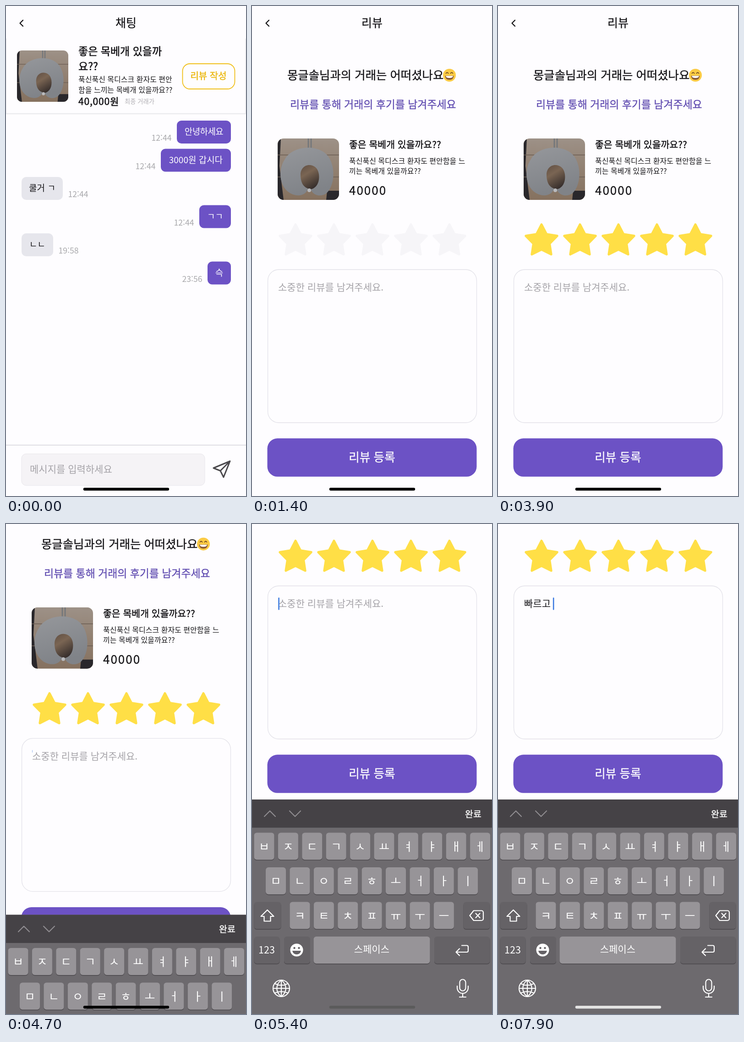
An HTML page for the animation above (8 s loop, 524x1069 px).

```html
<!DOCTYPE html>
<html lang="ko">
<head>
<meta charset="utf-8">
<style>
  html, body { margin: 0; width: 100%; height: 100%; overflow: hidden; background: #fefdff; }
  svg { display: block; width: 100%; height: 100%; }
  text { font-family: "Noto Sans CJK KR", "Noto Sans CJK JP", "Noto Sans CJK", sans-serif; white-space: pre; }
</style>
</head>
<body>
<svg id="stage" viewBox="0 0 524 1069"></svg>
<script>
const LOOP = 8000, W = 524, H = 1069;
const PURPLE = '#6c52c5', PAPER = '#fefdff', INK = '#161518', MUTED = '#a5a3a8';
const KEY = '#979498', DARK_KEY = '#656266';

// ---- SVG helpers ----
const rect = (x, y, w, h, rx, fill, extra = '') =>
  `<rect x="${x}" y="${y}" width="${w}" height="${h}" rx="${rx}" fill="${fill}" ${extra}/>`;
const line = (d, stroke, width, extra = '') =>
  `<path d="${d}" fill="none" stroke="${stroke}" stroke-width="${width}" stroke-linecap="round" stroke-linejoin="round" ${extra}/>`;
const text = (str, x, y, size, { fill = INK, anchor = 'start', bold = 0, weight = 400, ls = 0, id = '' } = {}) =>
  `<text ${id && `id="${id}"`} x="${x}" y="${y}" font-size="${size}" font-weight="${weight}" fill="${fill}" text-anchor="${anchor}"
    letter-spacing="${ls}" ${bold ? `stroke="${fill}" stroke-width="${bold}"` : ''}>${str}</text>`;

const header = title => line('M37 31L30.500 37.500L37 44', INK, 2.3) +
  text(title, 262, 46, 25, { anchor: 'middle', bold: .3 });

const photo = (x, y, size) => `<use href="#photo" transform="translate(${x} ${y}) scale(${size / 134})"/>`;

const defs = `<defs>
  <clipPath id="frame"><rect width="134" height="134" rx="13"/></clipPath>
  <linearGradient id="wood" x2="0" y2="1">
    <stop offset="0" stop-color="#9d9187"/><stop offset=".6" stop-color="#8f7d6d"/><stop offset="1" stop-color="#85715f"/>
  </linearGradient>
  <linearGradient id="shade" x2=".5" y2="1">
    <stop offset="0" stop-color="#5a4a40"/><stop offset=".45" stop-color="#7a6553"/><stop offset="1" stop-color="#352d2b"/>
  </linearGradient>
  <linearGradient id="fabric" x2=".3" y2="1">
    <stop offset="0" stop-color="#95979b"/><stop offset="1" stop-color="#808388"/>
  </linearGradient>
  <g id="photo" clip-path="url(#frame)">
    <rect width="134" height="134" fill="url(#wood)"/>
    <path d="M0 0H7L4 60L13 134H0ZM108 114H134V134H106Z" fill="#29272b"/>
    <path d="M0 36H134M0 84H134" stroke="#6b5d53" stroke-width="1.500"/>
    <path d="M67 0V26M73 0V26" stroke="#74777b" stroke-width="3"/>
    <ellipse cx="70" cy="84" rx="24" ry="30" fill="url(#shade)"/>
    <path d="M66 109C62 127 38 128 24 117C4 103 0 68 16 45C33 14 94 10 113 43C128 69 122 107 106 120C94 128 78 125 72 111
      C86 108 92 94 90 78C88 64 79 58 69 58C58 58 50 67 50 79C50 93 54 105 66 109Z" fill="url(#fabric)"/>
    <circle cx="69" cy="113" r="4" fill="#b9babd"/>
  </g>
</defs>`;

// ---- chat screen ----
const bubbles = [
  ['안녕하세요', 373, 118, '12:44', -.6], ['3000원 갑시다', 338, 153, '12:44', 0],
  ['쿨거 ㄱ', 34, 90, '12:44', 0], ['ㄱㄱ', 422, 69, '12:44', 0],
  ['ㄴㄴ', 34, 69, '19:58', 0], ['슥', 440, 51, '23:56', 0]
];
const bubble = ([msg, x, w, time, ls], i) => {
  const y = 250 + 61.5 * i, mine = x > 100;
  return rect(x, y, w, 50, 10, mine ? PURPLE : '#e6e6ec') +
    text(msg, x + w / 2, y + 31, 19, { fill: mine ? '#fff' : INK, anchor: 'middle', weight: 300, ls }) +
    text(time, mine ? x - 11.5 : x + w + 11.5, y + 44, 17.6,
      { fill: '#a9a9ac', anchor: mine ? 'end' : 'start', weight: 300 });
};
const chat = rect(0, 0, W, H, 0, PAPER) + header('채팅') +
  line('M0 72V235H523.500V72', '#ebebee', 2.5) + photo(24, 97, 112) +
  text('좋은 목베개 있을까', 158, 107, 23, { bold: .6 }) + text('요??', 158, 140, 23, { bold: .6 }) +
  text('푹신푹신 목디스크 환자도 편안', 158, 166, 16, { weight: 300 }) +
  text('함을 느끼는 목베개 있을까요??', 158, 189, 16, { weight: 300 }) +
  text('40,000원', 158, 216, 21, { bold: .6, ls: .8 }) +
  text('최종 거래가', 259, 213, 13.3, { fill: '#b0aeb3', weight: 300 }) +
  rect(385.5, 126, 114, 55, 16, PAPER, 'stroke="#f0bf1a" stroke-width="1.8"') +
  text('리뷰 작성', 442, 160, 20, { fill: '#ecb913', anchor: 'middle', bold: .5 }) +
  bubbles.map(bubble).join('') +
  line('M0 958H524', '#dfdee4', 2) +
  rect(34, 977, 400, 69, 10, '#f5f3f6', 'stroke="#e8e6eb"') +
  text('메시지를 입력하세요', 52, 1018, 21, { fill: MUTED, weight: 300 }) +
  line('M489 993L453 1008L468 1014L475 1028ZL468 1014', '#4b494d', 3);

// ---- review screen ----
const starPoints = Array.from({ length: 10 }, (_, i) => {
  const r = i % 2 ? 18.5 : 36, a = (i / 5 - .5) * Math.PI;
  return `${(r * Math.cos(a)).toFixed(2)},${(r * Math.sin(a)).toFixed(2)}`;
}).join(' ');
const stars = [0, 1, 2, 3, 4].map(i =>
  `<polygon points="${starPoints}" transform="translate(${95 + 84 * i} 512.7)"/>`).join('');
const emoji = `<circle cx="431" cy="151" r="14" fill="#fbcb45"/>` +
  line('M423.500 147Q426 143 428.500 147M433.500 147Q436 143 438.500 147', '#6b4320', 1.6) +
  `<path d="M421.500 152H440.500Q440 161 431 161T421.500 152Z" fill="#8a5a34"/>
   <path d="M423 152.500H439Q438.500 157 431 157T423 152.500Z" fill="#fff"/>`;
const review = rect(0, 0, W, H + 440, 0, PAPER) + header('리뷰') +
  text('몽글솔님과의 거래는 어떠셨나요', 77, 160, 25.4, { bold: .4 }) + emoji +
  text('리뷰를 통해 거래의 후기를 남겨주세요', 83, 223, 22.9, { fill: '#5f4bb0', bold: .3 }) +
  photo(56, 289, 134) +
  text('좋은 목베개 있을까요??', 212, 310, 20.5, { bold: .5 }) +
  text('푹신푹신 목디스크 환자도 편안함을 느', 212, 344, 16, { weight: 300 }) +
  text('끼는 목베개 있을까요??', 212, 366, 16, { weight: 300 }) +
  text('40000', 212, 412, 26, { bold: .3, ls: 2 }) +
  `<g id="stars" stroke-width="5" stroke-linejoin="round">${stars}</g>` +
  rect(34.5, 575, 456, 334, 24, PAPER, 'stroke="#e3e2e9" stroke-width="1.3"') +
  text('소중한 리뷰를 남겨주세요.', 57, 621, 21, { fill: MUTED, weight: 300, id: 'hint' }) +
  text('', 57, 621, 21, { id: 'typed' }) +
  rect(0, 0, 2.6, 27, 1, '#3d7be0', 'id="caret"') +
  rect(33.5, 943.3, 457, 83.5, 22, PURPLE) +
  text('리뷰 등록', 262, 994, 25.6, { fill: '#fff', anchor: 'middle', bold: .3 });

// ---- keyboard, drawn from its own top edge ----
const keyBox = (name, x, y, w, fill) => rect(x, y + 1.5, w, 59, 6, '#4b484c') +
  rect(x, y, w, 59, 6, fill, `data-key="${name}"`);
const letterRow = (letters, x0, y) => [...letters].map((c, i) => {
  const x = x0 + 52.4 * i;
  return keyBox(c, x, y, 44, KEY) +
    `<g data-letter="${c}">${text(c, x + 22, y + 39, 25, { fill: '#fff', anchor: 'middle' })}</g>`;
}).join('');
const icon = (d, extra) => line(d, '#fff', 2.2, extra);
const keyboard = rect(0, 0, W, 480, 0, '#6d6a6e') + rect(0, 0, W, 61.5, 0, '#454246') +
  line('M27 37L39 25L51 37M82 25L94 37L106 25', '#8f8c90', 2.2) +
  text('완료', 483, 38.5, 19.5, { fill: '#fff', anchor: 'middle', bold: .4 }) +
  letterRow('ㅂㅈㄷㄱㅅㅛㅕㅑㅐㅔ', 4.5, 72.5) +
  letterRow('ㅁㄴㅇㄹㅎㅗㅓㅏㅣ', 30, 148) +
  letterRow('ㅋㅌㅊㅍㅠㅜㅡ', 82.5, 223.5) +
  keyBox('shift', 4.5, 223.5, 59, DARK_KEY) + keyBox('del', 461.5, 223.5, 58, DARK_KEY) +
  keyBox('num', 4.5, 299, 56, DARK_KEY) + keyBox('emoji', 70, 299, 57, DARK_KEY) +
  keyBox('space', 134.5, 299, 254, KEY) + keyBox('enter', 398, 299, 121.5, DARK_KEY) +
  icon('M33.500 241L47.500 255H40.500V265.500H26.500V255H19.500Z', 'id="shiftArrow"') +
  icon('M484 242.500H501A4 4 0 0 1 505 246.500V260A4 4 0 0 1 501 264H484L475.500 253.300ZM488.500 248.500L497.500 258M497.500 248.500L488.500 258') +
  text('123', 32, 336, 21.5, { fill: '#fff', anchor: 'middle' }) +
  `<circle cx="97.500" cy="328.500" r="14" fill="#fff"/><circle cx="92.500" cy="324" r="2.200" fill="${DARK_KEY}"/>
   <circle cx="102.500" cy="324" r="2.200" fill="${DARK_KEY}"/><path d="M88 330H107Q105 338 97.500 338T88 330Z" fill="${DARK_KEY}"/>` +
  text('스페이스', 261.5, 333.5, 21, { fill: '#fff', anchor: 'middle', weight: 300 }) +
  icon('M458 318.500H469A3 3 0 0 1 472 321.500V330A3 3 0 0 1 469 333H446M453 325.500L445.500 333L453 340.500') +
  icon('M46 412A18 18 0 1 1 82 412A18 18 0 1 1 46 412H82M64 394V430M64 394C51 404 51 420 64 430C77 420 77 404 64 394M50 402Q64 408 78 402M50 422Q64 416 78 422') +
  icon('M453.500 399A6.500 6.500 0 0 1 466.500 399V411A6.500 6.500 0 0 1 453.500 411ZM448 407V411A12 12 0 0 0 472 411V407M460 423V431M453 431H467');

const stage = document.getElementById('stage');
stage.innerHTML = defs + `<g id="chat">${chat}</g><g id="review">${review}</g><g id="keyboard">${keyboard}</g>` +
  rect(168.7, 1051, 187.5, 6.2, 3.1, '#000', 'id="homeBar"');
const $ = id => document.getElementById(id);
const keys = [...stage.querySelectorAll('[data-key]')].map(el => ({ el, name: el.dataset.key, base: el.getAttribute('fill') }));
const letters = [...stage.querySelectorAll('[data-letter]')].map(el => ({ el: el.firstElementChild, name: el.dataset.letter }));

// ---- timing ----
const PUSH = 300, RATED = 2300, FOCUS = 4615.5, SHIFT_ON = 5750, SHIFT_OFF = 6100;
const presses = [
  [6100, 'ㅂ', 'ㅃ'], [6320, 'ㅏ', '빠'], [6520, 'ㄹ', '빨'], [6680, 'ㅡ', '빠르'],
  [6860, 'ㄱ', '빠륵'], [7040, 'ㅗ', '빠르고'], [7210, 'space', '빠르고 ']
];
const doubled = { ㅂ: 'ㅃ', ㅈ: 'ㅉ', ㄷ: 'ㄸ', ㄱ: 'ㄲ', ㅅ: 'ㅆ', ㅐ: 'ㅒ', ㅔ: 'ㅖ' };
const barTones = [[4700, 0], [4900, 58], [6400, 158], [7900, 227]];

const clamp = v => Math.max(0, Math.min(1, v));
// critically damped spring, as used for system transitions
const spring = ms => { const x = Math.max(0, ms) * .01826; return 1 - Math.exp(-x) * (1 + x); };
const easeInOut = p => (1 - Math.cos(Math.PI * clamp(p))) / 2;
const track = (points, t) => points.reduce((v, [t1, v1], i) => {
  const [t0, v0] = points[i - 1] || [t1 - 1, v1];
  return t >= t0 ? v0 + (v1 - v0) * clamp((t - t0) / (t1 - t0)) : v;
}, points[0][1]);
const move = (id, x, y) => $(id).setAttribute('transform', `translate(${x.toFixed(2)} ${y.toFixed(2)})`);
const show = (id, on) => $(id).setAttribute('visibility', on ? 'visible' : 'hidden');

function render(t) {
  const push = t > PUSH + 600 ? 1 : spring(t - PUSH);
  move('chat', -.3 * W * push, 0);
  move('review', W * (1 - push), -440 * easeInOut((t - FOCUS) / 260));
  move('keyboard', 0, H - 468 * spring(t - FOCUS));
  show('keyboard', t > FOCUS);

  const starColor = t < RATED ? '#f6f5f8' : '#ffdf46';
  $('stars').setAttribute('fill', starColor);
  $('stars').setAttribute('stroke', starColor);

  const last = presses.filter(([at]) => t >= at).pop();
  const value = last ? last[2] : '';
  $('typed').textContent = value;
  show('hint', !value);
  const caretX = 57.3 + [...value].reduce((sum, c) => sum + (c === ' ' ? 4.7 : 19.3), 0);
  const grow = clamp((t - 4675) / 130);
  $('caret').setAttribute('transform', `translate(${caretX} 600.5) scale(${grow})`);

  const shifted = t >= SHIFT_ON && t < SHIFT_OFF;
  for (const { el, name, base } of keys) {
    const pressed = last && last[1] === name && t - last[0] < 120;
    el.setAttribute('fill', name === 'shift' && shifted ? '#b5b2b6' : pressed ? '#aaa7ab' : base);
  }
  for (const { el, name } of letters) el.textContent = shifted && doubled[name] || name;
  $('shiftArrow').setAttribute('fill', shifted ? '#fff' : 'none');

  const tone = Math.round(track(barTones, t));
  $('homeBar').setAttribute('fill', `rgb(${tone},${tone},${tone})`);
}

function tick() {
  render(performance.now() % LOOP);
  requestAnimationFrame(tick);
}
tick();
</script>
</body>
</html>
```
